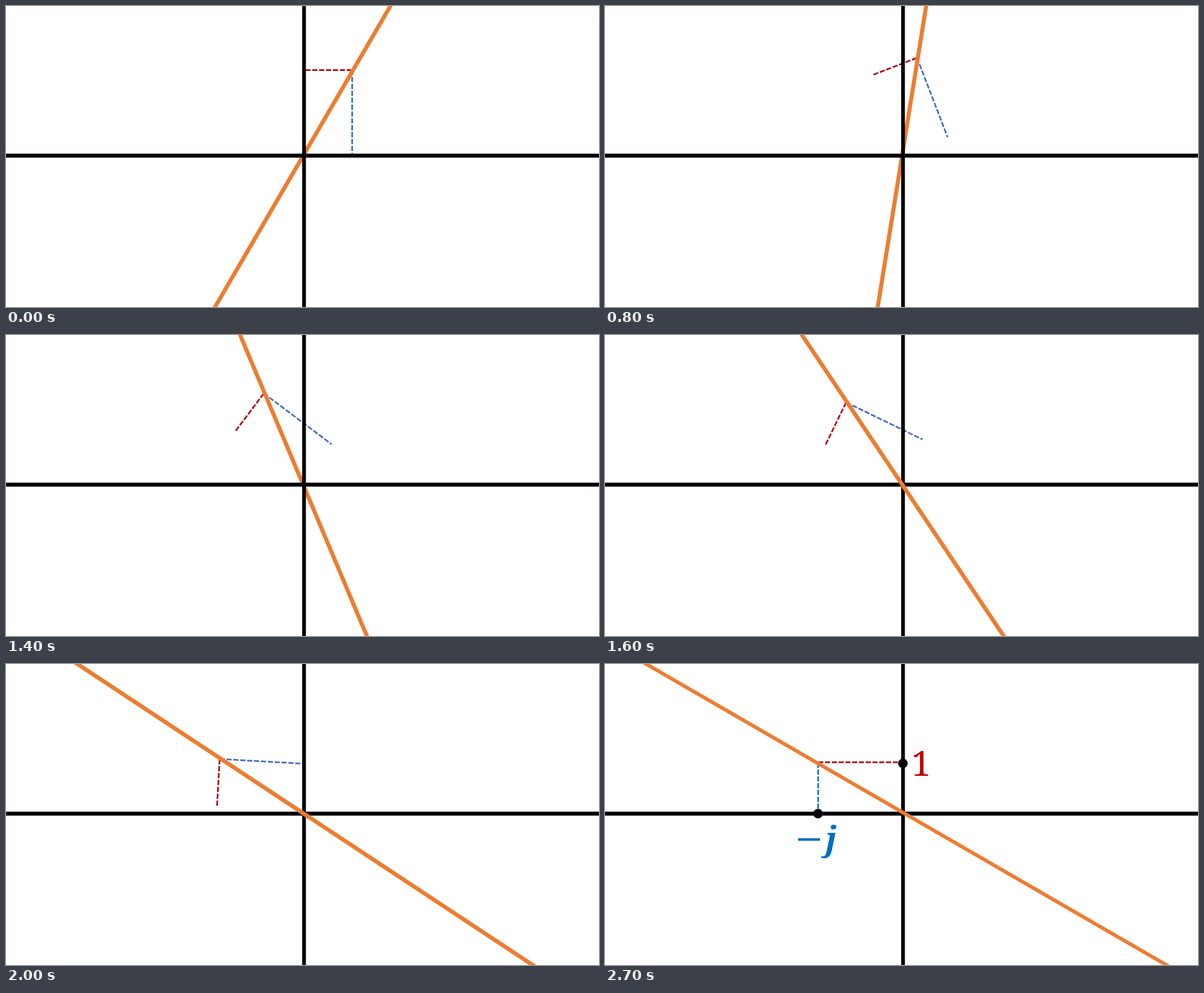
Animation, 1051 px wide and 533 px high, one loop 3.9 s. Source, as an HTML page with a canvas:

```html
<!DOCTYPE html>
<html lang="en">
<head>
<meta charset="utf-8">
<title>Rotating line</title>
<style>
  html, body { margin: 0; width: 100%; height: 100%; overflow: hidden; background: #fff; }
  canvas { display: block; }
</style>
</head>
<body>
<canvas id="stage" width="1051" height="533"></canvas>
<script>
const ctx = document.getElementById('stage').getContext('2d');
const W = 1051, H = 533, LOOP = 3900, STEP = 200, RESULT_AT = 2700;
const ORANGE = '#ed7d31', RED = '#b30b10', BLUE = '#4472c4', LABEL_BLUE = '#0070c0', LABEL_RED = '#c00000';
const PIVOT = { x: 525, y: 265 };
const SLOPE = 59.75 * Math.PI / 180;

// Turn in degrees at each 200 ms step: eased start, steady middle, short stop.
const TURN = [0, 2.4, 6.8, 13.1, 21.1, 31.4, 42.2, 53.1, 64.1, 75.8, 86.8, 90];

function line(x1, y1, x2, y2, color, width, dash = []) {
  ctx.strokeStyle = color;
  ctx.lineWidth = width;
  ctx.setLineDash(dash);
  ctx.beginPath();
  ctx.moveTo(x1, y1);
  ctx.lineTo(x2, y2);
  ctx.stroke();
}

function dot(x, y) {
  ctx.fillStyle = '#000';
  ctx.beginPath();
  ctx.arc(x, y, 8.5, 0, Math.PI * 2);
  ctx.fill();
}

// Places a glyph by the left and bottom edges of its ink.
function glyph(char, left, bottom, font, color) {
  ctx.font = font;
  ctx.fillStyle = color;
  const box = ctx.measureText(char);
  ctx.fillText(char, left + box.actualBoundingBoxLeft, bottom - box.actualBoundingBoxDescent);
}

function axes() {
  line(0, 265, W, 265, '#000', 7);
  line(528.2, 0, 528.2, H, '#000', 6.6);
}

function rotated(draw, degrees) {
  ctx.save();
  ctx.translate(PIVOT.x, PIVOT.y);
  ctx.rotate(-degrees * Math.PI / 180);
  draw();
  ctx.restore();
}

function guides() {
  const dash = [9.15, 3.05];
  line(88, -151.5, 3, -151.5, RED, 3, dash);
  line(88.5, -151.5, 88.5, -1, BLUE, 3, dash);
}

function slopeLine() {
  const dx = 900 * Math.cos(SLOPE), dy = 900 * Math.sin(SLOPE);
  line(1.75 - dx, dy, 1.75 + dx, -dy, ORANGE, 7.2);
}

function turning(degrees) {
  const lineOnTop = degrees > 60;
  rotated(guides, degrees);
  if (lineOnTop) axes();
  rotated(slopeLine, degrees);
  if (!lineOnTop) axes();
}

function result() {
  const dash = [9, 3];
  line(378, 174, 526, 174, RED, 2.8, dash);
  line(377.8, 175, 377.8, 262, LABEL_BLUE, 2.8, dash);
  axes();
  const ext = 20, k = 533 / 922;
  line(73 - ext, -ext * k, 995 + ext, H + ext * k, ORANGE, 6.4);
  dot(528, 176);
  dot(377.5, 265);
  glyph('1', 547, 198, '62px "Noto Serif", serif', LABEL_RED);
  ctx.fillStyle = LABEL_BLUE;
  ctx.fillRect(342, 308.5, 39, 4.5);
  glyph('j', 382, 344, 'italic bold 58px "Noto Serif", serif', LABEL_BLUE);
}

function render(time) {
  ctx.fillStyle = '#fff';
  ctx.fillRect(0, 0, W, H);
  if (time >= RESULT_AT) result();
  else turning(TURN[Math.min(Math.floor(time / STEP), TURN.length - 1)]);
}

const start = performance.now();
function tick() {
  render((performance.now() - start) % LOOP);
  requestAnimationFrame(tick);
}
tick();
</script>
</body>
</html>
```
